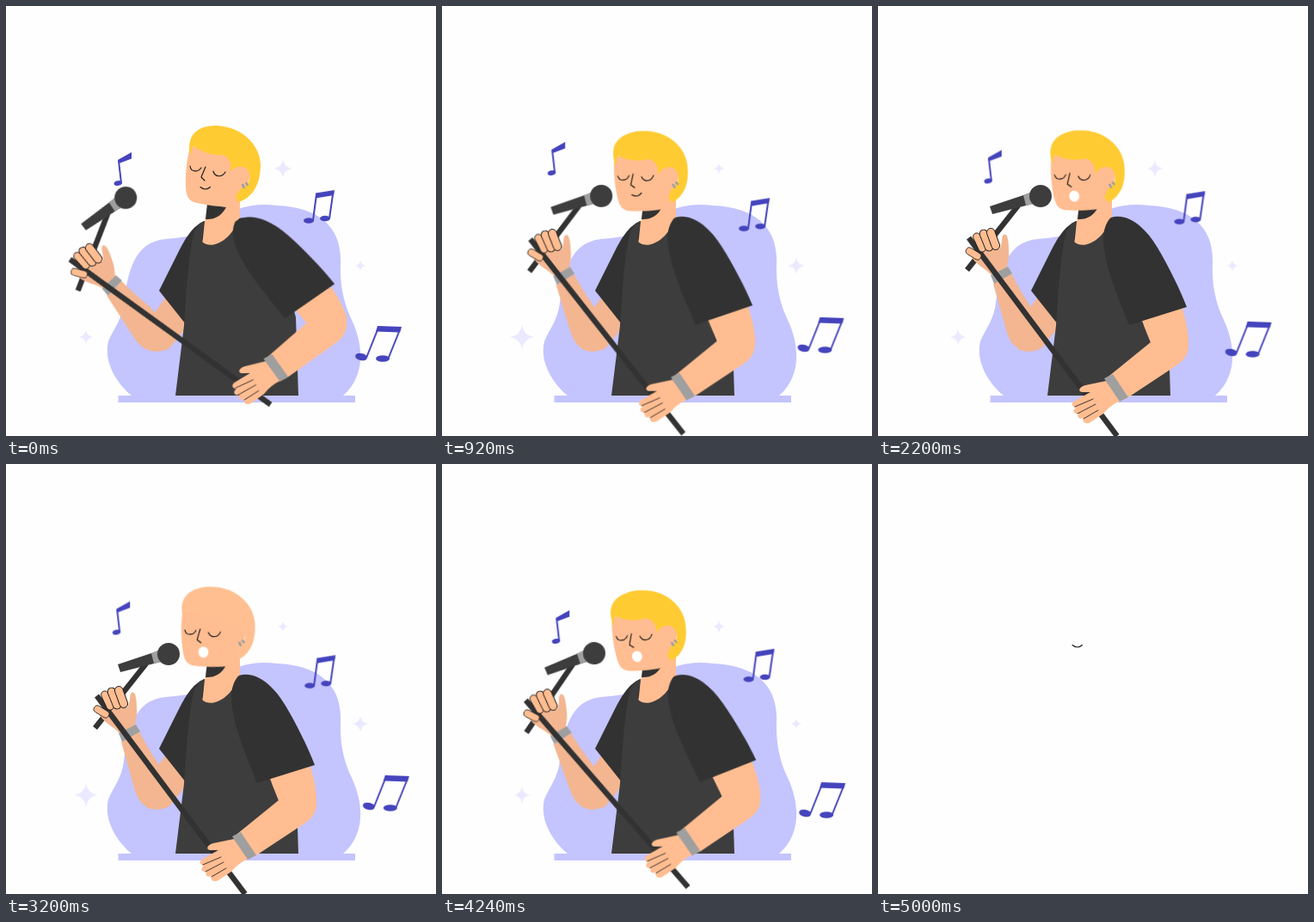
Recreate the animation shown at these times as an HTML page without scripts. Size 500 by 500 pixels, loop 5.04 s.

```html
<!DOCTYPE html>
<html lang="en">
<head>
<meta charset="utf-8">
<title>Singer</title>
<style>
html, body { margin: 0; width: 100%; height: 100%; overflow: hidden; background: #fefefe; }
svg { display: block; width: 100%; height: 100%; }

.scene, .swing, .mic, .head, .hair, .open, .smile, .note, .star { animation: 5.04s linear infinite; }
.scene { animation-name: scene; }
.swing { animation-name: swing; }
.mic { animation-name: tilt; transform-origin: 163px 233px; }
.head { animation-name: nod; transform-origin: 272px 244px; }
.hair { animation-name: flash; fill: #ffcb33; }
.open { animation-name: open; fill: #fff; }
.smile { animation-name: smile; }
.star { animation-name: twinkle; fill: #ebe9ff; }

.stand { --swing: -17.3deg; transform-origin: 172.6px 384.4px; }
.shoulder { --swing: -17.4deg; transform-origin: 283px 261px; }
.elbow { --swing: 15.4deg; transform-origin: 350px 388px; }

.skin { fill: #ffbd91; }
.shade { fill: #f3b691; }
.shirt { fill: #3d3d3d; }
.dark { fill: #323232; }
.band { fill: #9f9f9f; }
.lilac { fill: #c4c4ff; }
.line { fill: none; stroke: #151515; stroke-width: 1.1; stroke-linecap: round; stroke-linejoin: round; }
.thin { stroke-width: .8; }
.finger { fill: #ffbd91; stroke: #151515; stroke-width: .9; }
.rod { stroke: #323232; stroke-width: 6.3; }
.note { fill: #4544bd; stroke: #4544bd; stroke-width: 0; }
.note .stem { fill: none; stroke-width: 2; }

/* The arms and the stand swing in, rest, and swing back. */
@keyframes swing {
  0%, 99.21%, 100% { transform: rotate(var(--swing)); }
  19.84%, 79.37% { transform: rotate(0deg); }
}
@keyframes tilt {
  0%, 99.21%, 100% { transform: rotate(-1.5deg); }
  7.94% { transform: rotate(4deg); }
  19.84%, 79.37% { transform: rotate(0deg); }
}
@keyframes nod {
  0%, 99.21%, 100% { transform: rotate(0deg); }
  19.84% { transform: rotate(-11.5deg); }
  33.73% { transform: rotate(-3deg); }
  49.6% { transform: rotate(-13.4deg); }
  67.46% { transform: rotate(-4.5deg); }
  84.13% { transform: rotate(-13deg); }
}
@keyframes scene {
  0%, 99.2% { opacity: 1; }
  99.201%, 100% { opacity: 0; }
}
@keyframes flash {
  0%, 63.48%, 64.29%, 100% { fill: #ffcb33; }
  63.49%, 64.28% { fill: #ffbf90; }
}
@keyframes open {
  0%, 19.83%, 88.9%, 100% { opacity: 0; }
  19.84%, 88.89% { opacity: 1; }
}
@keyframes smile {
  0%, 19.83%, 88.9%, 100% { opacity: 1; }
  19.84%, 88.89% { opacity: 0; }
}
@keyframes twinkle {
  0%, 39.68%, 99.21%, 100% { transform: scale(var(--start)); }
  19.84%, 59.52% { transform: scale(var(--peak)); }
  79.37% { transform: scale(var(--late)); }
}
@keyframes float-single {
  0%, 99.21%, 100% { transform: translate(0, 0); }
  19.84% { transform: translate(-3px, -13px); }
  39.68% { transform: translate(-2px, 0); }
  59.52% { transform: translate(-3px, -13px); }
  79.37% { transform: translate(3px, 0); }
}
@keyframes float-pair {
  0%, 99.21%, 100% { transform: translate(0, 0); }
  19.84% { transform: translate(-1px, 10px); }
  39.68% { transform: translate(-2px, -1px); }
  59.52% { transform: translate(0, 10px); }
  79.37% { transform: translate(6px, 1px); }
}
@keyframes float-wide {
  0%, 99.21%, 100% { transform: translate(0, 0); }
  19.84% { transform: translate(8px, -11px); }
  39.68% { transform: translate(-5px, -3.5px); }
  59.52% { transform: translate(8px, -12px); }
  79.37% { transform: translate(12px, -2.6px); }
}
</style>
</head>
<body>
<svg viewBox="0 0 500 500">
  <defs>
    <path id="spark" d="M0-1Q.14-.14 1 0Q.14.14 0 1Q-.14.14-1 0Q-.14-.14 0-1Z"/>
    <rect id="finger" x="-4.8" y="-13" width="9.6" height="26" rx="4.8"/>
  </defs>

  <g class="scene">
    <g class="lilac">
      <path d="M146 453C130 440 113 415 119 390C125 375 135 365 137 345C142 310 148 275 185 271C215 268 230 267 245 250C262 235 290 228 315 232C365 234 391 258 389 300C388 330 395 350 402 365C416 395 418 430 392 453Z"/>
      <rect x="130.500" y="453" width="275.500" height="8"/>
    </g>

    <g transform="translate(322 189)"><use class="star" href="#spark" style="--start:10.5;--peak:6;--late:6"/></g>
    <g transform="translate(412 302)"><use class="star" href="#spark" style="--start:6;--peak:10;--late:6"/></g>
    <g transform="translate(93 385)"><use class="star" href="#spark" style="--start:8;--peak:14.5;--late:10"/></g>

    <g class="note" style="animation-name:float-single">
      <path d="M130 179L146 170V177.500L131.500 183Z"/>
      <path class="stem" d="M131 180L134 206"/>
      <ellipse cx="130.300" cy="206" rx="4.800" ry="2.800" transform="rotate(-12 130 206)"/>
    </g>
    <g class="note" style="animation-name:float-pair">
      <path d="M360 217.500L382 214L381 220L360 223.500Z"/>
      <path class="stem" d="M361 219L357 249M380.500 216L376 247"/>
      <ellipse cx="352" cy="249.500" rx="6" ry="3.300"/>
      <ellipse cx="371" cy="247" rx="6" ry="3.300"/>
    </g>
    <g class="note" style="animation-name:float-wide">
      <path d="M432 372L460 373L458 379.500L430 378.500Z"/>
      <path class="stem" d="M433 374L419 409M458.500 375L444 411"/>
      <ellipse cx="413" cy="408" rx="7" ry="4.200" transform="rotate(12 413 408)"/>
      <ellipse cx="438" cy="410" rx="8" ry="3.800"/>
    </g>

    <!-- Torso and neck -->
    <path class="shade" d="M186 338L212 366L207 377L190 398Q175 405 163 399L158 380L172 358Z"/>
    <path class="skin" d="M236 222L231.500 249L222 276L243 284L264 272L272 248V212Z"/>
    <path class="dark" d="M234 230L232 248Q248 249 256 234Z"/>
    <path class="dark" d="M231 250C217 255 208 271 200 287L178 331L209 370L224 300L229 270Z"/>
    <path class="shirt" d="M219 262C224 254 229 250 231 250C228 262 228 269 228 274C240 285 263 271 271 247C290 243 310 265 320 300L337 362L340 453H197L207 372C210 330 212 290 219 262Z"/>

    <!-- Head -->
    <g class="head">
      <path class="skin" d="M214 164C210 180 209 192 209 206C209 220 211 227 222 229Q238 233 262 234L274 222L285 196L262 160Z"/>
      <path class="hair" d="M214 173C210 150 222 139 245 139C278 141 297 165 296 187C295 210 285 224 270 228L267 221L273 212C286 209 287 189 275 187C268 186 263 190 260 193C264 181 258 174 250 173C238 174 226 169 219 163C215 166 216 171 214 173Z"/>
      <path d="M275 207l2 5M279 205l2 4" stroke="#9f9f9f" stroke-width="2.600"/>
      <path class="line" d="M214 186C215 194 224 193 227 188M241 192C243 200 252 199 255 193M232 187L227 199L231 203"/>
      <ellipse class="open" cx="232.600" cy="214.200" rx="5.800" ry="6.500"/>
    </g>

    <!-- Left forearm with microphone stand -->
    <g class="swing stand">
      <path class="shade" d="M134 323L155 311C165 330 170 338 178 350L190 380L175 402C160 400 154 392 150 380Z"/>
      <path class="rod" d="M163 232L103.500 307"/>
      <g class="mic">
        <path class="shirt" d="M130 233L172 219L184 214V229L133 242Z"/>
        <path class="band" d="M169 220L177 217L180 230L172 232Z"/>
        <circle class="shirt" cx="189" cy="221" r="13"/>
      </g>
      <path class="shade" d="M116 289L130 278L141 283C145 278 143 268 146 266C151 263 152 275 152 284C153 294 150 300 150 304L133 314C125 305 112 300 108 290Z"/>
      <path class="band" d="M131 313L151 303L156 311L135 323Z"/>
      <path class="rod" d="M105.500 269.500L278 500"/>
      <g class="finger">
        <use href="#finger" transform="translate(111 288) rotate(-58) scale(.86 .75)"/>
        <use href="#finger" transform="translate(118 275) rotate(-25) scale(.9)"/>
        <use href="#finger" transform="translate(126 272.500) rotate(-22)"/>
        <use href="#finger" transform="translate(134 271) rotate(-20)"/>
      </g>
    </g>

    <!-- Right arm -->
    <g class="swing shoulder">
      <path class="skin" d="M300 360L353 348C358 365 361 378 361 392L350 408L317 391L307 366Z"/>
      <g class="swing elbow">
        <path class="skin" d="M264 434L317 391L309 371L330 372Q361 375 361 391C362 406 355 413 344 420L291 455L281 460Z"/>
        <path class="skin" d="M265 436L241 441C234 443 232 448 237 449L247 449L229 459C224 462 225 466 230 467C225 471 228 475 233 474C231 479 235 481 239 479C237 484 242 487 247 484L262 474Q270 464 282 459Z"/>
        <path class="line thin" d="M229 466L250 457M232 474L253 463M239 480L256 470"/>
        <path class="band" d="M263 433L273 428L291 455L281 460Z"/>
      </g>
      <path class="dark" d="M262 268C263 257 267 249 271 246C290 240 311 257 325 281C338 303 350 327 359 350L292 371C278 335 262 300 262 268Z"/>
    </g>
  </g>

  <g class="head"><path class="line smile" d="M226 210.500Q232 215.500 237.500 210.500"/></g>
</svg>
</body>
</html>
```
